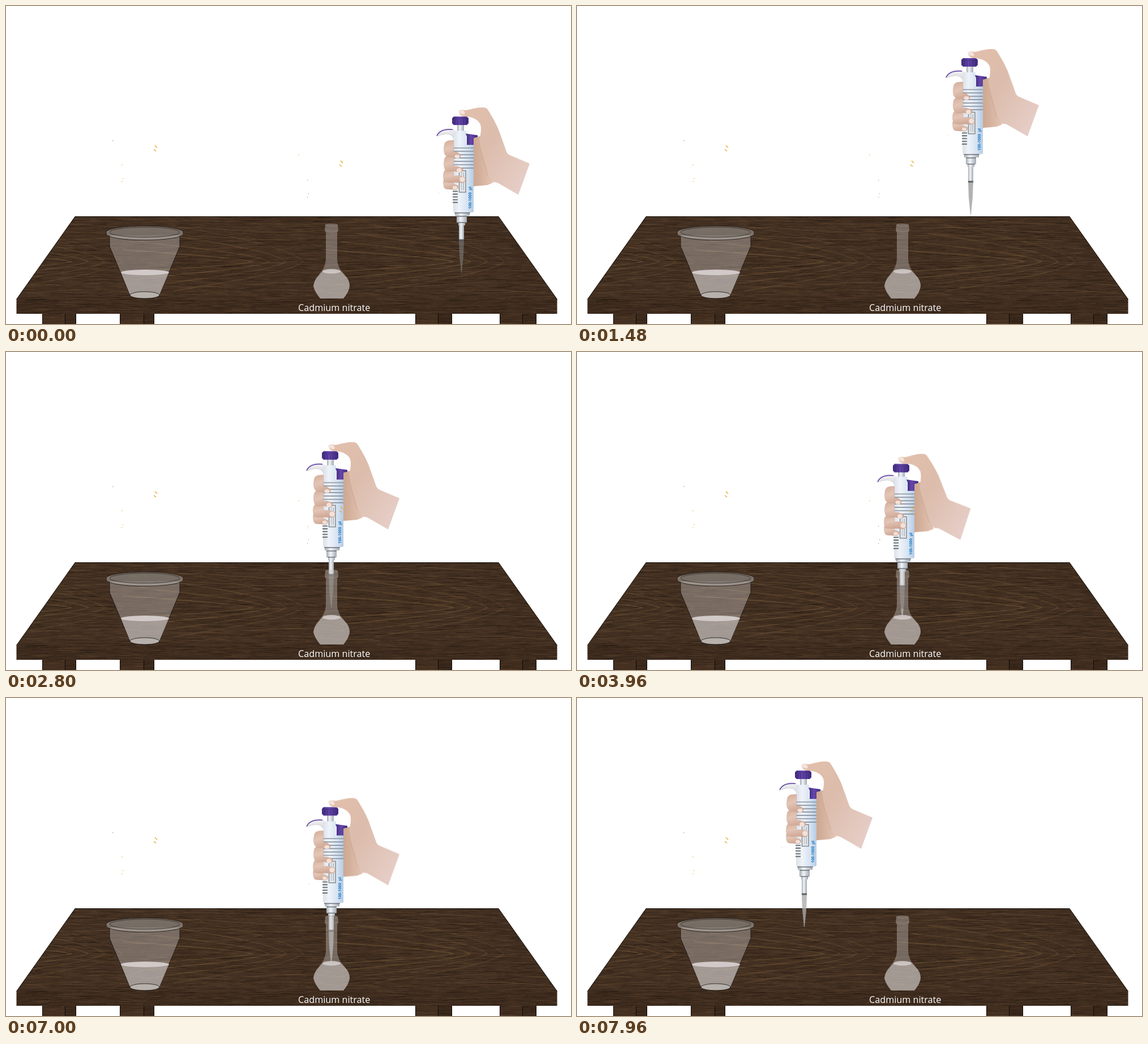
An HTML page with a canvas for the animation above (8 s loop, 998 by 561 pixels).

```html
<!DOCTYPE html>
<html lang="en">
<head>
<meta charset="utf-8">
<title>Pipetting cadmium nitrate</title>
<style>
html, body { margin: 0; width: 100%; height: 100%; overflow: hidden; background: #fff; }
canvas, svg { position: absolute; left: 0; top: 0; width: 998px; height: 561px; }
#hand { transform-origin: 861px 265px; }
</style>
</head>
<body>
<canvas id="table" width="998" height="561"></canvas>
<svg viewBox="0 0 998 561">
  <defs>
    <linearGradient id="skin" x1="0" y1="0" x2="1" y2=".8">
      <stop offset="0" stop-color="#e3c0ac"/><stop offset=".45" stop-color="#dcbcab"/><stop offset="1" stop-color="#e6cec7"/>
    </linearGradient>
    <linearGradient id="palm">
      <stop offset="0" stop-color="#cda791"/><stop offset="1" stop-color="#e2c4b3"/>
    </linearGradient>
    <linearGradient id="finger" x1="0" y1="0" x2=".3" y2="1">
      <stop offset="0" stop-color="#d5ad99"/><stop offset=".5" stop-color="#e3c5b6"/><stop offset="1" stop-color="#d0a896"/>
    </linearGradient>
    <linearGradient id="shell">
      <stop offset="0" stop-color="#dce1e9"/><stop offset=".3" stop-color="#eff3f9"/><stop offset=".7" stop-color="#d5e2f1"/><stop offset="1" stop-color="#b4cbe4"/>
    </linearGradient>
    <linearGradient id="metal">
      <stop offset="0" stop-color="#a3abb4"/><stop offset=".4" stop-color="#f2f5f8"/><stop offset="1" stop-color="#a0a8b2"/>
    </linearGradient>
    <linearGradient id="purple">
      <stop offset="0" stop-color="#3f2b7d"/><stop offset=".45" stop-color="#6547aa"/><stop offset="1" stop-color="#3f2b7d"/>
    </linearGradient>
    <linearGradient id="hook" x1="0" y1="0" x2="0" y2="1">
      <stop offset="0" stop-color="#f7f7f9"/><stop offset="1" stop-color="#d2d2d6"/>
    </linearGradient>
    <clipPath id="tipClip"><path d="M800 412H809L808 440 805 471H804L801 440Z"/></clipPath>
  </defs>

  <g id="pipette">
    <path d="M826 233Q840 226 848 236L860 312 850 316 826 318Z" fill="url(#palm)"/>
    <g id="plunger">
      <rect x="797" y="207" width="12" height="24" fill="url(#metal)"/>
      <path d="M791 195H814L817 198V207L814 210H791L788 207V198Z" fill="url(#purple)"/>
      <path d="M789 199H816M793 201V208M798 201V209M803 201V209M808 201V209M813 201V208" stroke="#33226a" stroke-width=".7" fill="none"/>
    </g>
    <g id="hand">
      <path d="M800 186Q801 182 812 184C826 181 832 179 842 179Q849 179 851 183C858 194 864 204 870 218Q878 240 884 257Q886 262 892 264L925 278 905 333 872 314Q866 310 861 311C851 302 848 280 842 264C838 250 836 244 836 236Q841 218 838 209C833 199 822 195 809 195Q801 194 800 186Z" fill="url(#skin)"/>
      <path d="M836 237C837 260 848 282 850 300" stroke="#c49d87" fill="none" opacity=".5"/>
      <path d="M799 186Q800 182 807 184 812 187 810 191 804 193 799 186Z" fill="#f4e2da"/>
    </g>
    <path d="M761 230Q767 216 781 216L791 218V235Q786 220 761 230Z" fill="url(#hook)" stroke="#c4c4ca" stroke-width=".5"/>
    <path d="M761 229Q767 216 789 218" fill="none" stroke="#5b3ba3" stroke-width="1.6"/>
    <path d="M793 220H813V244H826V362Q826 364 823 364H793Q790 364 790 362V224Q790 220 793 220Z" fill="url(#shell)"/>
    <path d="M812 225L833 228V231L826 233V245H814V230Z" fill="url(#purple)"/>
    <path id="ribs" stroke="#8b929c" stroke-width="1.7"/>
    <path id="notches" stroke="#59615f" stroke-width="1.6"/>
    <rect x="800.5" y="290.5" width="11.5" height="38" fill="#e4e8ec" stroke="#858b91" stroke-width="1.5"/>
    <rect x="804" y="294" width="5" height="31" fill="url(#metal)"/>
    <text transform="translate(822.3 358) rotate(-90)" font-family="'Open Sans',Arial,sans-serif" font-size="6.8" font-weight="700" fill="#1878c4" xml:space="preserve">100-1000  µl</text>

    <g fill="url(#finger)" stroke="#c29a87" stroke-width=".4" transform="translate(.7 0)">
      <path d="M790 304H775Q771 307 772 313 772 323 778 323L794 324Q799 322 798 317L790 314Z"/>
      <path d="M790 288Q776 286 773 292 770 302 774 309 780 313 790 311L805 312Q812 311 811 303L800 299 790 300Z"/>
      <path d="M790 264Q777 262 774 269 771 281 775 289 779 293 790 291L802 294Q808 292 806 286L796 283 790 283Z"/>
      <path d="M790 237Q776 236 774 243 771 256 775 263 780 268 791 266L798 269Q804 267 802 262L795 257 790 258Z"/>
    </g>
    <g fill="#f3e1d9">
      <ellipse cx="797" cy="265.5" rx="4.5" ry="3.2"/><ellipse cx="800.5" cy="290" rx="4.5" ry="4"/>
      <ellipse cx="806" cy="306" rx="4.8" ry="4.5"/><ellipse cx="793" cy="320.5" rx="4" ry="3"/>
    </g>
    <circle cx="765" cy="330.5" r=".7" fill="#e5c9a0"/>

    <g fill="url(#metal)">
      <rect x="793" y="364" width="26" height="6"/><rect x="796" y="370" width="18" height="12"/>
      <rect x="799" y="382" width="12" height="5"/><rect x="800" y="387" width="9" height="26"/>
    </g>
    <path d="M792 365H820M796 371H814M798 382H812" stroke="#6d747b" stroke-width="1.4"/>
    <path d="M800 412H809L808 440 805 471H804L801 440Z" fill="#7d7d7d" fill-opacity=".6"/>
    <g clip-path="url(#tipClip)"><rect id="liquid" x="798" y="418" width="13" height="60" fill="#cfcdcc" fill-opacity=".45"/></g>
    <rect x="800" y="411.5" width="9" height="3" fill="#505356" opacity=".85"/>
  </g>

  <g id="flask">
    <path d="M564 386Q564 384 575 384T586 386L587 396 585 399V447Q586 459 592 467L602 479Q607 486 607 494 606 504 596 516H555Q545 504 543 494 544 486 549 479L558 467Q564 459 565 447V399L563 396Z" fill="#cbc6c4" fill-opacity=".4"/>
    <path d="M559 468H592L602 479Q607 486 607 494 606 504 596 516H555Q545 504 543 494 544 486 549 479Z" fill="#d5d1cf" fill-opacity=".45"/>
    <ellipse cx="575" cy="468" rx="16" ry="4" fill="#d2cac9" fill-opacity=".9"/>
    <path d="M564 387Q575 390 586 387M564 397Q575 400 586 397" fill="none" stroke="#ddd" stroke-opacity=".2"/>
  </g>

  <g id="cup" stroke="#15110f" stroke-width=".8">
    <path d="M183 404V424L219 510A26 6 0 0 0 271 510L307 424V404Z" fill="#cdc8c5" fill-opacity=".4"/>
    <path d="M203 470H288L271 510A26 6 0 0 1 219 510Z" fill="#d5d1cf" fill-opacity=".45" stroke="none"/>
    <ellipse cx="245.5" cy="470" rx="42.5" ry="5" fill="#d2cac9" stroke="none"/>
    <ellipse cx="245" cy="510" rx="26" ry="6" fill="#d8d4d2" fill-opacity=".4"/>
    <path d="M177 399A68 11 0 0 1 313 399V402A68 11 0 0 1 177 402Z" fill="#bcb7b3" fill-opacity=".5"/>
    <ellipse cx="245" cy="399" rx="62" ry="9" fill="#6f665f" fill-opacity=".5" stroke-width=".6"/>
  </g>

  <g stroke="#e5a823" stroke-width="1.3">
    <path d="M263 246L267 250M261 253L265 256"/>
    <path d="M204 280h1.5M206 304.5h1.5M204 310h1.5" stroke="#f0c85c"/>
    <path d="M188 237.5h1.2" stroke="#999"/>
    <g id="specks">
      <path d="M591 273L595 277M589 280L593 283"/>
      <path d="M516 262.5h1.5" stroke="#f0c85c"/>
      <path d="M532 307.5h1.2M534 331h1.2M532 337.5h1.2" stroke="#aaa"/>
    </g>
  </g>
  <text x="516" y="538" font-family="'Open Sans','Noto Sans',sans-serif" font-size="16.2" fill="#fff">Cadmium nitrate</text>
</svg>

<script>
const LOOP = 8000;
const byId = id => document.getElementById(id);

// Evenly spaced horizontal strokes.
const rows = (x1, x2, y, step, count) =>
  Array.from({ length: count }, (_, i) => `M${x1} ${y + i * step}H${x2}`).join('');
byId('ribs').setAttribute('d', rows(790, 826, 250.5, 5.9, 7));
byId('notches').setAttribute('d', rows(789, 798, 327, 4.9, 5));

let seed = 7;
const rand = () => (seed = (seed * 16807) % 2147483647) / 2147483647;
const ctx = byId('table').getContext('2d');

function wood(points, base, figured) {
  ctx.save();
  ctx.beginPath();
  points.forEach(([x, y]) => ctx.lineTo(x, y));
  ctx.closePath();
  ctx.fillStyle = base;
  ctx.fill();
  ctx.clip();
  const xs = points.map(p => p[0]), ys = points.map(p => p[1]);
  const left = Math.min(...xs), top = Math.min(...ys);
  const width = Math.max(...xs) - left, height = Math.max(...ys) - top;
  if (figured) figure();
  for (let i = 0; i < width * height / 20; i++) {
    ctx.fillStyle = rand() < .55 ? 'rgba(22,13,8,.17)' : 'rgba(122,94,62,.12)';
    ctx.fillRect(left - 20 + rand() * (width + 20), top + Math.floor(rand() * height), 6 + rand() * 34, 1);
  }
  ctx.restore();
}

// Pale growth rings, pointed to the right, and long wavy grain.
function figure() {
  ctx.lineWidth = 1.8;
  for (const apex of [165, 485, 840]) {
    for (let k = 0; k < 4; k++) {
      const x = apex - 50 + k * 30, h = 8 + k * 11;
      ctx.strokeStyle = `rgba(140,108,66,${.4 - k * .06})`;
      ctx.beginPath();
      ctx.moveTo(x - 230, 440 - h * 1.3);
      ctx.bezierCurveTo(x - 140, 445 - h, x - 25, 449 - h * .6, x, 451);
      ctx.bezierCurveTo(x - 25, 455 + h * .4, x - 140, 458 + h * .7, x - 230, 462 + h);
      ctx.stroke();
    }
  }
  ctx.strokeStyle = 'rgba(130,100,64,.2)';
  for (const y of [382, 395, 408, 492, 505]) {
    ctx.beginPath();
    for (let x = 10; x < 990; x += 8) ctx.lineTo(x, y + 4 * Math.sin(x / 56 + y));
    ctx.stroke();
  }
}

const box = (x1, y1, x2, y2) => [[x1, y1], [x2, y1], [x2, y2], [x1, y2]];
for (const [x1, split, x2] of [[64, 104, 124], [201, 243, 262], [723, 763, 788], [872, 912, 937]]) {
  wood(box(x1, 543, split, 561), '#432f20');
  wood(box(split, 543, x2, 561), '#38271a');
  ctx.strokeStyle = '#0c0806';
  ctx.lineWidth = 1;
  ctx.strokeRect(x1 + .5, 542.5, split - x1, 20);
  ctx.strokeRect(split + .5, 542.5, x2 - split - 1, 20);
}
const surface = [[122, 371], [870, 371], [973.5, 517], [18.5, 517]];
wood(surface, '#433022', true);
wood(box(18.5, 517, 973.5, 543), '#3f2c1f');
ctx.strokeStyle = 'rgba(12,8,6,.8)';
ctx.lineWidth = 1;
ctx.beginPath();
[surface[3], surface[0], surface[1], surface[2]].forEach(([x, y]) => ctx.lineTo(x, y + .5));
ctx.stroke();

function play(id, steps, toStyle) {
  const frames = steps.map(([ms, ...v]) => ({ offset: ms / LOOP, ...toStyle(...v) }));
  const motion = byId(id).animate(frames, { duration: LOOP, iterations: Infinity });
  motion.startTime = document.timeline.currentTime;
}
const move = (x, y) => ({ transform: `translate(${x}px, ${y}px)` });

play('pipette', [
  [0, 0, 0], [950, -2, -103], [2080, -230, -103], [2975, -230, 0],
  [6975, -230, 0], [7665, -230, -67], [7960, -403, -67], [8000, -403, -67]
], move);
play('plunger', [[0, 0, 0], [3000, 0, 0], [5060, 0, 5], [6800, 0, 0], [8000, 0, 0]], move);
play('hand', [[0, 0], [3000, 0], [5060, -4], [6800, 0], [8000, 0]],
  deg => ({ transform: `rotate(${deg}deg)` }));
play('liquid', [[0, 0, 54], [3000, 0, 54], [5900, 0, -4], [8000, 0, -4]], move);
play('specks', [[0, 1], [6960, 1], [6960, 0], [8000, 0]], opacity => ({ opacity }));
</script>
</body>
</html>
```
